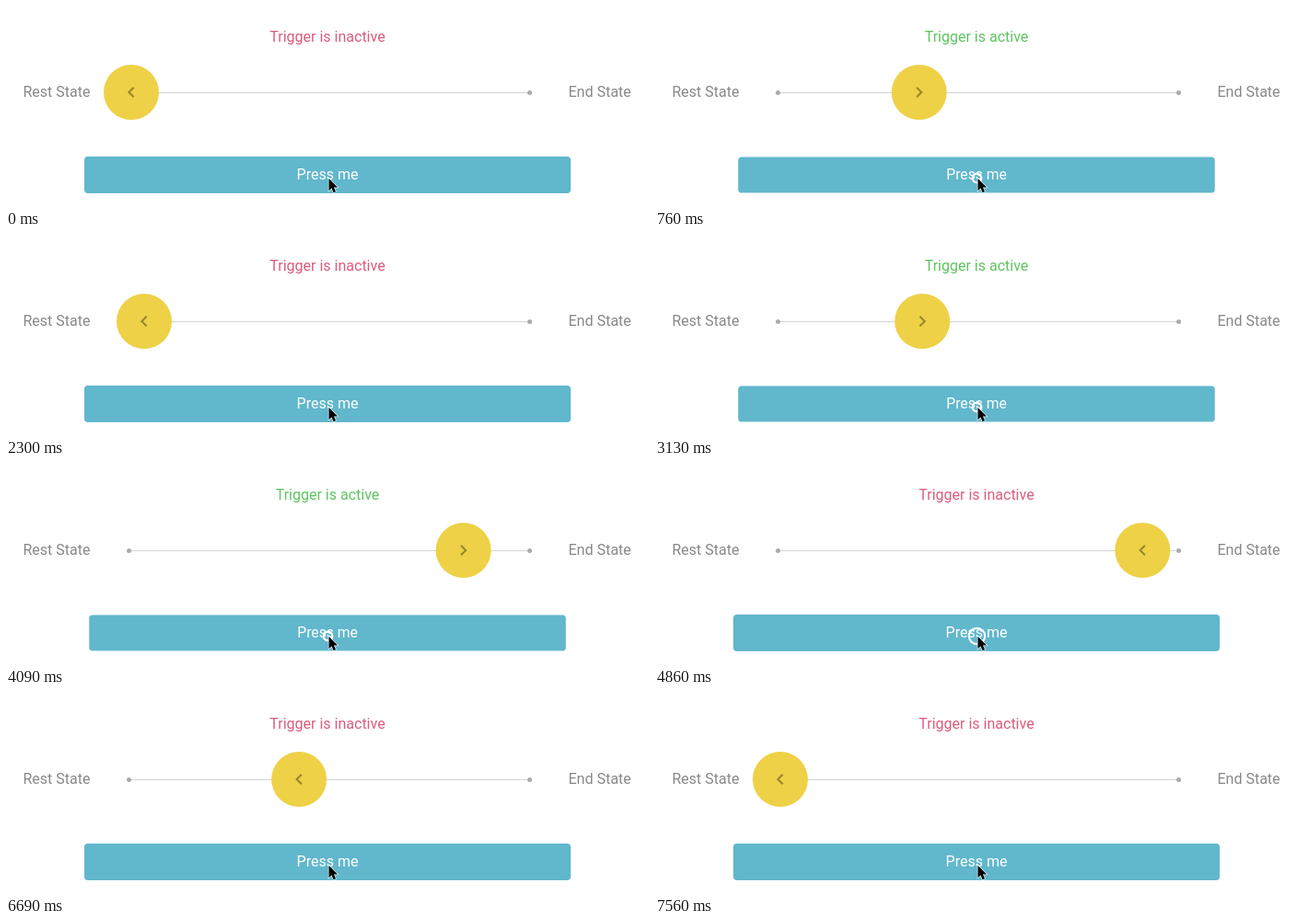
Recreate the animation shown at these times as an HTML page. Size 698 by 219 pixels, loop 8.56 s.

```html
<!DOCTYPE html>
<html lang="en">
<head>
<meta charset="utf-8">
<title>Press trigger</title>
<style>
  html, body { margin: 0; width: 100%; height: 100%; overflow: hidden; background: #fff; }
  svg { display: block; }
  text { font: 16px Roboto, sans-serif; fill: #888; }
  .middle { text-anchor: middle; }
  .stroke { fill: none; }
</style>
</head>
<body>
<svg width="698" height="219" viewBox="0 0 698 219">
  <text id="status" class="middle" x="349" y="39"></text>
  <text x="18.5" y="99">Rest State</text>
  <text x="610.5" y="99">End State</text>

  <path d="M133 94.5H569" stroke="#d4d4d4"/>
  <g fill="#aaa">
    <circle cx="133.5" cy="94.5" r="2.5"/>
    <circle cx="568.5" cy="94.5" r="2.5"/>
  </g>

  <g id="ball">
    <circle r="30" fill="#eed146"/>
    <path id="chevron" class="stroke" d="M-2.7 -5.3L2.6 0L-2.7 5.3" stroke="#000" stroke-opacity=".36" stroke-width="2"/>
  </g>

  <g id="button">
    <rect x="-264" y="-20" width="528" height="40" rx="4" fill="#61b7cc"/>
    <text class="middle" y="5" style="fill:#fff">Press me</text>
  </g>

  <circle id="ring" class="stroke" cx="349.5" cy="187.5" stroke="#fff" stroke-width="2.2"/>
  <path transform="translate(350.5 188)" d="M0 0V13.2L3 10.4L5.1 15.2L7.5 14.2L5.4 9.5H9.5Z"
        stroke="#fff" stroke-width="1.4" stroke-opacity=".8" paint-order="stroke"/>
</svg>
<script>
const LOOP = 8560;
const REST = 136, END = 566, TRAVEL = 2000;
const SPEED = (END - REST) / TRAVEL;
// Alternating press and release times.
const TOGGLES = [60, 1213, 2414, 4690, 5906, 6330];
const SCALE_TIME = 150, RING_IN = 120, RING_OUT = 360;

const [status, ball, chevron, button, ring] =
  ['status', 'ball', 'chevron', 'button', 'ring'].map(id => document.getElementById(id));
const clamp = (v, lo, hi) => Math.min(hi, Math.max(lo, v));
const mix = (a, b, k) => a + (b - a) * k;
const ease = k => k * k * (3 - 2 * k);

function stateAt(time) {
  let x = REST, active = false, since = -Infinity;
  const advance = to => {
    if (since > 0) x = clamp(x + (active ? SPEED : -SPEED) * (to - since), REST, END);
  };
  for (const toggle of TOGGLES) {
    if (toggle > time) break;
    advance(toggle);
    active = !active;
    since = toggle;
  }
  advance(time);
  return { x, active, age: time - since };
}

function draw(time) {
  const { x, active, age } = stateAt(time);

  status.textContent = active ? 'Trigger is active' : 'Trigger is inactive';
  status.style.fill = active ? '#5dc45f' : '#dc5b7c';
  ball.setAttribute('transform', `translate(${x} 94)`);
  chevron.setAttribute('transform', `scale(${active ? 1 : -1} 1)`);

  const pressed = ease(clamp(age / SCALE_TIME, 0, 1));
  const scale = mix(1, 0.98, active ? pressed : 1 - pressed);
  button.setAttribute('transform', `translate(349 184) scale(${scale})`);

  const k = clamp(age / (active ? RING_IN : RING_OUT), 0, 1);
  ring.setAttribute('r', active ? mix(12, 4.8, k) : mix(4.8, 13, k));
  ring.setAttribute('opacity', active ? k : 1 - k ** 3);
}

const start = performance.now();
function frame() {
  draw((performance.now() - start) % LOOP);
  requestAnimationFrame(frame);
}
frame();
</script>
</body>
</html>
```
